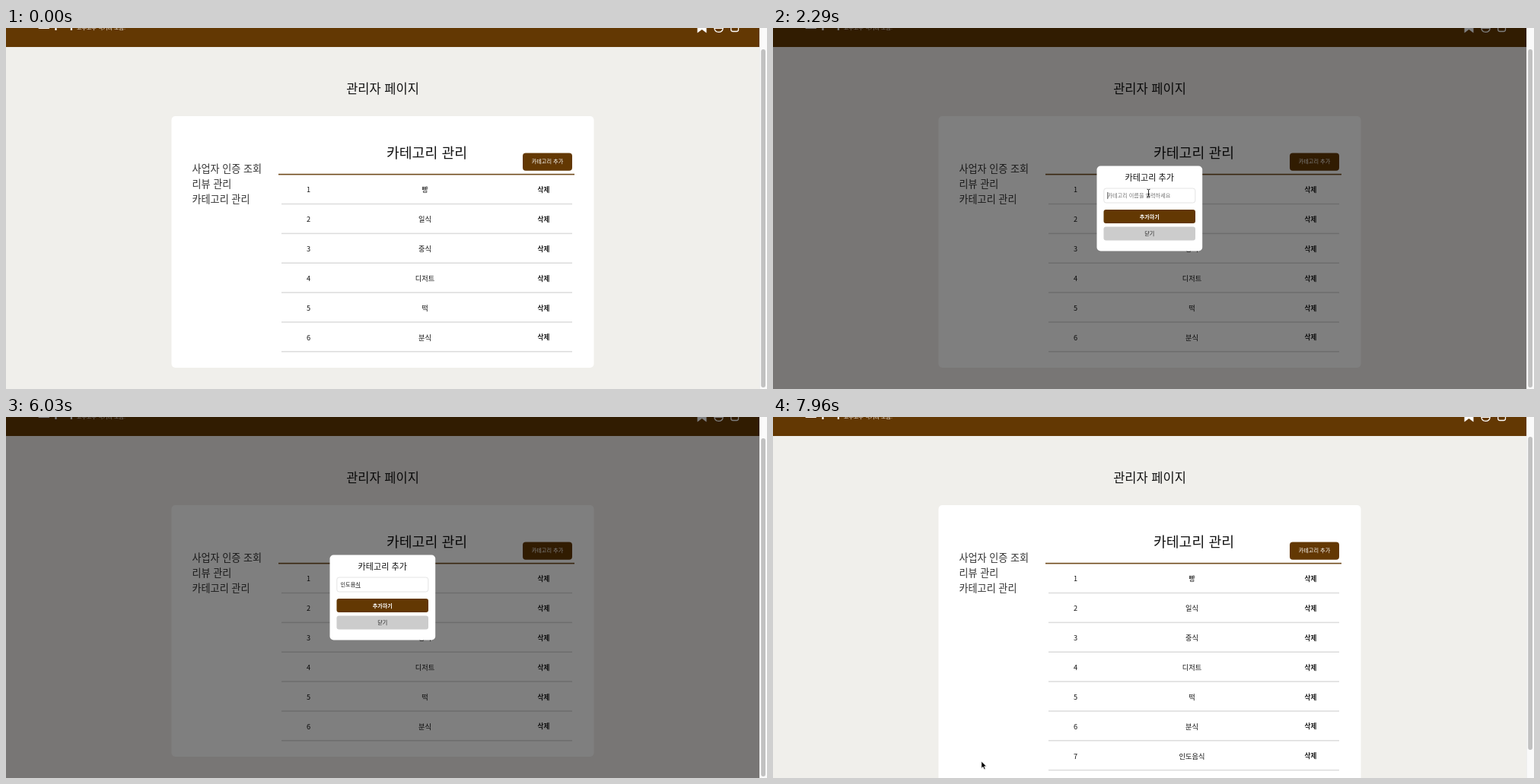
These frames come from a looping animation (1000 by 475 pixels, 8000 ms). An HTML page:

```html
<!DOCTYPE html>
<html lang="ko">
<head>
<meta charset="utf-8">
<title>관리자 페이지</title>
<style>
html, body { margin: 0; width: 100%; height: 100%; overflow: hidden; }
svg { display: block; width: 100vw; height: 100vh; }
text { font-family: "Noto Sans CJK KR", "Noto Sans CJK", "Noto Sans", sans-serif; white-space: pre; }
</style>
</head>
<body>
<svg id="stage" viewBox="0 0 1000 475"></svg>
<script>
const LOOP = 8000;
const BROWN = '#633803';
const stage = document.getElementById('stage');

function add(parent, tag, attrs = {}, content = '') {
  const node = document.createElementNS('http://www.w3.org/2000/svg', tag);
  for (const key in attrs) node.setAttribute(key, attrs[key]);
  node.textContent = content;
  parent.append(node);
  return node;
}
const group = parent => add(parent, 'g');
const box = (parent, x, y, width, height, fill, rx = 0, more = {}) =>
  add(parent, 'rect', { x, y, width, height, fill, rx, ...more });
const path = (parent, d, more) => add(parent, 'path', { d, ...more });

// Places text by its visual middle line.
function label(parent, content, x, midY, size, { anchor = 'middle', fill = '#111', weight = 400 } = {}) {
  return add(parent, 'text', {
    x, y: midY + size * 0.37, 'font-size': size, 'text-anchor': anchor, fill, 'font-weight': weight
  }, content);
}
const show = (node, on) => node.setAttribute('visibility', on ? 'visible' : 'hidden');

// Page
const page = box(stage, 0, 0, 990, 475, '#f0efeb');
box(stage, 0, 0, 990, 25, BROWN);
label(stage, '보두리', 42, -5, 17, { anchor: 'start', fill: '#fff', weight: 700 });
label(stage, '고루고루 먹거리 모음.', 93, -0.5, 7, { anchor: 'start', fill: '#fff' });
path(stage, 'M908.5-6V6.5L914.5 2L920.5 6.5V-6Z', { fill: '#fff' });
path(stage, 'M930.8-1Q930.8 5.4 936.5 5.4T942.3-1M930.8 .3H942.3M952.7-4V2Q952.7 4.5 955.2 4.5H960Q962.5 4.5 962.5 2V-4',
  { fill: 'none', stroke: '#fff', 'stroke-width': 1.3 });
label(stage, '관리자 페이지', 495, 80, 16.5, { weight: 500 });

// Category card
const card = box(stage, 217.5, 116, 555, 331, '#fff', 5);
['사업자 인증 조회', '리뷰 관리', '카테고리 관리'].forEach((item, i) =>
  label(stage, item, 244.5, 185 + i * 20.3, 13.1, { anchor: 'start', fill: '#333', weight: 500 }));
label(stage, '카테고리 관리', 553, 164.5, 18.3);
box(stage, 679, 164.5, 65, 23.3, BROWN, 4);
label(stage, '카테고리 추가', 711.5, 175.8, 7.2, { fill: '#fff' });
box(stage, 358, 191.8, 389, 1.6, '#704a1c');

const rows = ['빵', '일식', '중식', '디저트', '떡', '분식', '인도음식'].map((name, i) => {
  const row = group(stage);
  const y = 213 + i * 38.85;
  label(row, i + 1, 397.5, y, 9.2);
  label(row, name, 550.5, y, 9.2);
  label(row, '삭제', 706.5, y, 8.6, { weight: 600, fill: '#222' });
  box(row, 362, y + 17.8, 382, 1.5, '#dcdcdc');
  return row;
});
const newRow = rows[6];

// Modal
const modal = group(stage);
box(modal, 0, 0, 990, 475, '#000', 0, { opacity: 0.5 });
box(modal, 425.5, 181.5, 138.7, 112, '#fff', 5);
label(modal, '카테고리 추가', 494.8, 197, 11.1, { weight: 500 });
box(modal, 434.8, 211, 120, 19, '#fff', 3, { stroke: '#ddd', 'stroke-width': 0.8 });
box(modal, 434.5, 239, 120.5, 18, BROWN, 3);
label(modal, '추가하기', 494.8, 248, 7.1, { fill: '#fff', weight: 600 });
box(modal, 434.5, 261.5, 120.5, 18, '#ccc', 3);
label(modal, '닫기', 494.8, 270.5, 7.1, { fill: '#222', weight: 500 });
const INPUT_X = 439.5, CHAR = 7.15 * 0.92;
const input = label(modal, '', INPUT_X, 220.5, 7.15, { anchor: 'start' });
const underline = box(modal, INPUT_X, 224.2, CHAR, 0.7, '#222');
const caret = box(modal, INPUT_X, 216, 0.7, 9, '#111');

// Scrollbar
box(stage, 990, 0, 10, 475, '#fafafa');
box(stage, 990, 0, 0.6, 475, '#e6e6e6');
const thumb = box(stage, 992.2, 28, 5.8, 445, '#c1c1c1', 2.9);

// Pointers, hot spot at the origin
const pointer = group(stage);
const outlined = { stroke: '#fff', 'stroke-width': 0.8, 'stroke-linejoin': 'round' };
const pointers = {
  arrow: path(pointer, 'M0 0V9.4L2.2 7.4L3.8 11L5.4 10.3L3.9 6.8H6.8Z', { fill: '#000', ...outlined }),
  hand: path(pointer, 'M-1 .8Q-.3-.5.6.8L1.4 4L2.6 3.5L3.6 4.2L4.7 4L5.4 5Q6.6 4.8 6.6 6.5L5.8 10.5H1L-1.8 6.6Q-1.8 5.3-.2 6.2Z',
    { fill: '#fff', stroke: '#000', 'stroke-width': 0.8, 'stroke-linejoin': 'round' }),
  beam: path(pointer, 'M-2-4.8Q0-4.8 0-3.6Q0-4.8 2-4.8M0-3.6V3.8M-2 5Q0 5 0 3.8Q0 5 2 5M-1.2 1.8H1.2',
    { fill: 'none', stroke: '#111', 'stroke-width': 0.9 })
};

// start, end, number of steps, from, to
const moves = [
  [800, 1160, 8, [790, 468], [730, 177.5]],
  [1360, 1930, 8, [730, 177.5], [493.5, 217]],
  [6070, 6630, 14, [493.5, 217], [497, 246]],
  [7670, 7870, 4, [497, 246], [273.8, 453]]
];
const typing = [
  [0, ''], [3910, '이'], [3990, '인'], [4070, '인ㄷ'], [4150, '인도'], [4250, '인동'],
  [4340, '인도으'], [4420, '인도음'], [5360, '인도음ㅅ'], [5440, '인도음시'], [5530, '인도음식']
];
const caretSpans = [[2230, 2440], [2930, 3430], [3990, 4750], [5120, 6030]];
const within = (t, spans) => spans.some(([from, to]) => t >= from && t < to);

function pointerAt(t) {
  const [start, end, steps, from, to] = moves.filter(move => t >= move[0]).pop() || moves[0];
  const progress = Math.min(1, Math.floor((t - start) / (end - start) * steps + 1e-6) / steps);
  const eased = progress * progress * (3 - 2 * progress);
  return from.map((value, i) => value + (to[i] - value) * eased);
}

function pointerKind(x, y, open) {
  const over = (x1, y1, x2, y2) => x >= x1 && x <= x2 && y >= y1 && y <= y2;
  if (!open) return over(679, 164, 744, 188) ? 'hand' : 'arrow';
  if (over(434, 211, 555, 230)) return 'beam';
  return over(434, 239, 555, 257) || over(434, 261, 555, 280) ? 'hand' : 'arrow';
}

function render(t) {
  const open = t >= 1360 && t < 7960;
  const saved = t >= 7960;
  page.setAttribute('fill', t < 120 || t >= 7670 ? '#f0efeb' : '#f2eeec');
  modal.style.display = open ? '' : 'none';
  newRow.style.display = saved ? '' : 'none';
  card.setAttribute('height', saved ? 370 : 331);
  thumb.setAttribute('y', saved ? 26 : 28);
  thumb.setAttribute('height', saved ? 412 : 445);

  const value = typing.filter(step => t >= step[0]).pop()[1];
  input.textContent = value || '카테고리 이름을 입력하세요';
  input.setAttribute('fill', value ? '#111' : '#757575');
  const end = INPUT_X + value.length * CHAR;
  underline.setAttribute('x', end - CHAR);
  caret.setAttribute('x', end);
  show(underline, open && value && t < 6590);
  show(caret, open && within(t, caretSpans));

  const [x, y] = pointerAt(t);
  const kind = pointerKind(x, y, open);
  const hidden = t < 800 || within(t, [[3990, 6070]]);
  pointer.setAttribute('transform', `translate(${x} ${y})`);
  for (const name in pointers) show(pointers[name], !hidden && name === kind);
}

const begin = performance.now();
function tick() {
  render((performance.now() - begin) % LOOP);
  requestAnimationFrame(tick);
}
tick();
</script>
</body>
</html>
```
